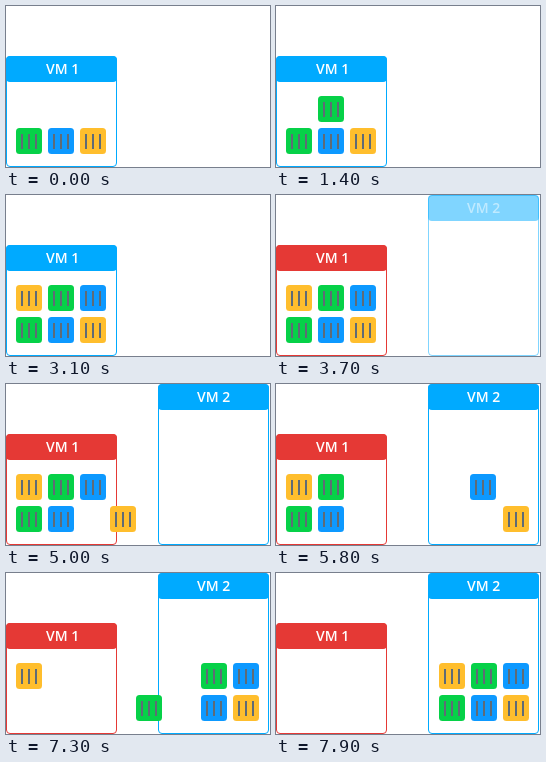
An HTML page for the animation above (8000 ms loop, 264x161 px).

```html
<!DOCTYPE html>
<html lang="en">
<head>
<meta charset="utf-8">
<title>Moving containers between VMs</title>
<style>
  html, body { margin: 0; width: 100%; height: 100%; overflow: hidden; background: #fff; }
  svg { display: block; width: 264px; height: 161px; }
  text { font: 600 14px "Open Sans", "Noto Sans", sans-serif; fill: #fff; }
</style>
</head>
<body>
<svg id="stage" viewBox="0 0 264 161"></svg>
<script>
const LOOP = 8000, TICK = 100, STEPS = 5;
const BLUE = '#00aaff', RED = '#e53935';
const GREEN_TILE = '#06d148', BLUE_TILE = '#0d99ff', YELLOW_TILE = '#ffbe2d';
const stage = document.getElementById('stage');

function add(parent, tag, attrs) {
  const el = document.createElementNS('http://www.w3.org/2000/svg', tag);
  for (const key in attrs) el.setAttribute(key, attrs[key]);
  return parent.appendChild(el);
}

function makeVm(x, y, textX, label) {
  const group = add(stage, 'g', {});
  const frame = add(group, 'rect', {
    x: x + 0.5, y: y + 0.5, width: 110, height: 160 - y, rx: 3.5, fill: 'none'
  });
  const head = add(group, 'rect', { x, y, width: 111, height: 26, rx: 4 });
  const text = add(group, 'text', { x: textX, y: y + 18 });
  text.textContent = label;
  return {
    paint(color) {
      frame.setAttribute('stroke', color);
      head.setAttribute('fill', color);
    },
    // The parts fade separately, so the label is tinted by its header.
    fade(alpha) {
      for (const part of [frame, head, text]) part.setAttribute('opacity', alpha);
    }
  };
}

function makeTile([x, y, color, shown, leaves]) {
  const el = add(stage, 'g', {});
  add(el, 'rect', { width: 26, height: 26, rx: 3.5, fill: color });
  for (const bar of [5, 12, 19]) {
    add(el, 'rect', { x: bar, y: 6, width: 2, height: 15, fill: '#5f6b76' });
  }
  return { el, x, y, shown, leaves };
}

const vm1 = makeVm(0, 50, 40, 'VM 1');
const vm2 = makeVm(152, 0, 191, 'VM 2');
vm2.paint(BLUE);

const arrow = add(stage, 'path', {
  d: 'M116 119H146M139.5 112.7L146 119L139.5 125.3',
  fill: 'none', stroke: BLUE, 'stroke-width': 2
});

// x, y, colour, start of fade-in, start of move
const tiles = [
  [74, 122, YELLOW_TILE, -500, 4900],
  [74, 90, BLUE_TILE, 1900, 5400],
  [42, 122, BLUE_TILE, -500, 5900],
  [42, 90, GREEN_TILE, 900, 6400],
  [10, 122, GREEN_TILE, -500, 6900],
  [10, 90, YELLOW_TILE, 1400, 7400]
].map(makeTile);

const step = (t, start) => Math.max(0, Math.min(STEPS, (t - start) / TICK));
const fadeIn = (t, start) => Math.pow(step(t, start) / STEPS, 1.36);
const shift = k => k < STEPS ? 30 * k : 153;

function vm1Color(t) {
  if (t < 2500) return BLUE;
  if (t >= 3300) return RED;
  return Math.floor((t - 2500) / 200) % 2 ? BLUE : RED;
}

function render(time) {
  const t = Math.floor((time % LOOP) / TICK) * TICK;
  vm1.paint(vm1Color(t));
  vm2.fade(fadeIn(t, 3400));
  arrow.setAttribute('opacity', fadeIn(t, 3900) * (1 - step(t, 4400) / STEPS));
  for (const tile of tiles) {
    const x = tile.x + shift(step(t, tile.leaves));
    tile.el.setAttribute('transform', `translate(${x} ${tile.y})`);
    tile.el.setAttribute('opacity', fadeIn(t, tile.shown));
  }
}

let origin = null;
function loop(now) {
  if (origin === null) origin = now;
  render(now - origin);
  requestAnimationFrame(loop);
}
render(0);
requestAnimationFrame(loop);
</script>
</body>
</html>
```
